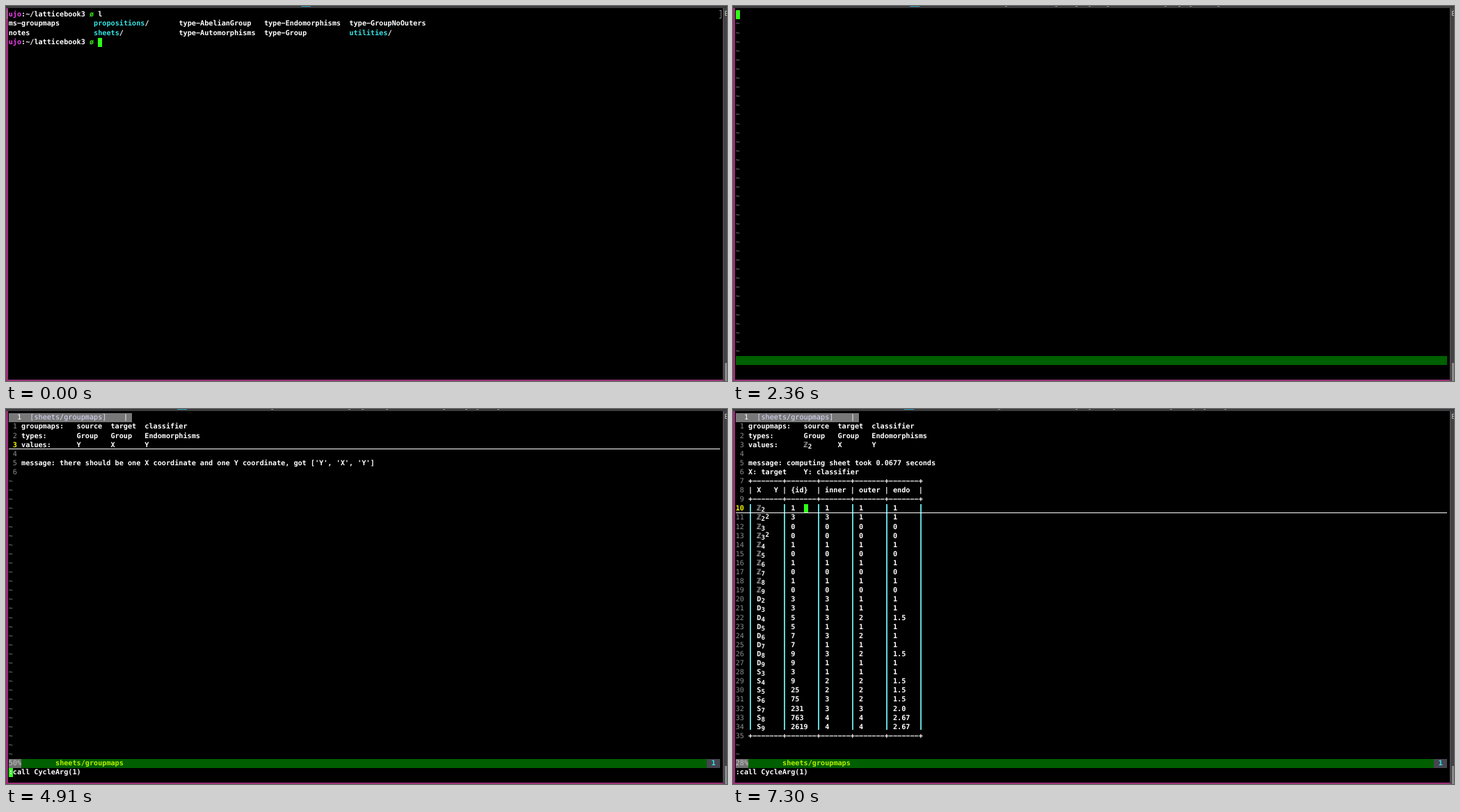
These frames come from a looping animation (1036x540 px, 8000 ms). An HTML page:

```html
<!DOCTYPE html>
<html lang="en">
<head>
<meta charset="utf-8">
<title>Terminal</title>
<style>
html, body { margin: 0; width: 100%; height: 100%; overflow: hidden; background: #000; }
#stage { position: relative; width: 1036px; height: 540px; overflow: hidden; background: #000; }
#stage i { position: absolute; display: block; }
#stage b {
  position: absolute; white-space: pre; font: 10.166px/13.1px "DejaVu Sans Mono", monospace;
  text-rendering: geometricPrecision;
}
#stage b.bold { font-weight: bold; }
#stage b.index { font-size: 9.2px; }
</style>
</head>
<body>
<div id="stage"></div>
<script>
const LOOP = 8000, CW = 6.12, RH = 13.1, X0 = 3.7, Y0 = 6.3, COLS = 167;
const WHITE = '#fff', GREY = '#8c8c8c', CYAN = '#35e3e3', GREEN = '#2fff17',
      MAGENTA = '#f03cf0', YELLOW = '#f5f500', BORDER = '#9c3078', BAR = '#005f00';
const PROMPT = ':~/latticebook3 ';
const LOWER = '₀₁₂₃₄₅₆₇₈₉';

const rect = (x, y, w, h, color) =>
  `<i style="left:${x}px;top:${y}px;width:${w}px;height:${h}px;background:${color}"></i>`;
const fill = (row, col, n, color) =>
  rect(X0 + col * CW, Y0 + row * RH, n * CW, RH, color);
const glyphs = (row, col, text, color, cls, dy = 0) =>
  `<b class="${cls}" style="left:${X0 + col * CW}px;top:${Y0 + row * RH + dy}px;color:${color}">${text}</b>`;

// Index digits get their own cell, everything else is set as one run.
function put(row, col, text, color = WHITE, cls = 'bold') {
  let out = '';
  for (const run of text.match(/[₀-₉²ℤ]|[^₀-₉²ℤ]+/g) || []) {
    const low = LOWER.indexOf(run);
    if (low >= 0) out += glyphs(row, col, low, color, 'bold index', 2);
    else if (run === '²') out += glyphs(row, col, 2, color, 'bold index', -1.5);
    else if (run.trim()) out += glyphs(row, col, run.replace(/-/g, '−'), color, cls);
    col += run.length;
  }
  return out;
}

function frame(tab, ticks) {
  return rect(0, 0, 1036, 3, '#3c3b3d') + rect(tab, 0, 14, 1, '#2aa5c4') +
    ticks.map(x => rect(x, 0, 3, 1, '#8f8f8f')).join('') +
    rect(0, 3, 3, 537, BORDER) + rect(0, 538, 1030, 2, BORDER) +
    rect(1030, 3, 6, 537, '#434244') + rect(1030, 3, 1, 537, '#565557') +
    rect(1033, 7, 3, 7, '#b5b5b5') + rect(1034, 8, 2, 2, '#434244') + rect(1034, 11, 2, 2, '#434244') +
    rect(1033, 514, 3, 26, '#8b8a8c');
}

function marks(row) {
  const y = Y0 + row * RH, c = '#858585';
  return rect(1, y, 1, 11, c) + rect(1, y, 2, 1, c) + rect(1, y + 11, 2, 1, c) +
    rect(1027, y, 1, 11, c) + rect(1025, y, 2, 1, c) + rect(1025, y + 11, 3, 1, c);
}

const prompt = row => put(row, 0, 'ujo', MAGENTA) + put(row, 3, PROMPT) + put(row, 19, 'ø', '#39d916');

function shell(typed, done) {
  const dir = (row, col, name) => put(row, col, name, CYAN) + put(row, col + name.length, '/');
  return frame(424, []) + marks(0) + (done ? marks(3) : '') +
    prompt(0) + put(0, 21, 'l') +
    put(1, 0, 'ms-groupmaps') + dir(1, 20, 'propositions') + put(1, 40, 'type-AbelianGroup') +
    put(1, 60, 'type-Endomorphisms') + put(1, 80, 'type-GroupNoOuters') +
    put(2, 0, 'notes') + dir(2, 20, 'sheets') + put(2, 40, 'type-Automorphisms') +
    put(2, 60, 'type-Group') + dir(2, 80, 'utilities') +
    prompt(3) + put(3, 21, typed) + fill(3, 21 + typed.length, 1, GREEN);
}

function tildes(from) {
  let out = '';
  for (let row = from; row < 38; row++) out += put(row, 0, '~', '#8a8a8a', '');
  return out;
}

const opening = (tab, ticks) =>
  frame(tab, ticks) + fill(0, 0, 1, GREEN) + tildes(1) + fill(38, 0, COLS, BAR);

function editor({ name, lines, line, col, rule = WHITE, cmd = '', busy, tab, ticks }) {
  const pct = Math.floor(100 * line / lines.length) + '%';
  let out = frame(tab, ticks) + fill(0, 0, 29, '#787878') + put(0, 2, '1', WHITE, '') +
    put(0, 5, `[${name}]`, '#dcdcff', '') + put(0, 27, '|', WHITE, '');
  out += busy ? fill(39, 0, 1, GREEN) : fill(line, 3 + col, 1, GREEN);
  lines.forEach((text, i) => {
    const row = i + 1, now = row === line;
    out += put(row, 0, String(row).padStart(2), now ? YELLOW : GREY, now ? 'bold' : '') + put(row, 3, text);
  });
  if (lines.length > 30) {
    for (let c = 0; c <= 40; c += 8)
      out += rect(X0 + (c + 3.5) * CW - .7, Y0 + 10 * RH, 1.4, 25 * RH - 3, '#62d5d5');
  }
  out += rect(X0, Y0 + line * RH + 11.7, COLS * CW, 1.2, rule);
  return out + tildes(lines.length + 1) + fill(38, 0, COLS, BAR) +
    fill(38, 0, pct.length, '#707070') + put(38, 0, pct, '#c4c4c4', '') +
    put(38, pct.length + 8, name, '#b4f000') +
    fill(38, 164, 3, '#454550') + put(38, 165, '1', CYAN) + put(39, 0, cmd);
}

const source = [
  'source   target   classifier',
  'Group Group Endomorphisms',
  '',
  'classify injective group homomorphisms from source to target, up to composition with ' +
    'automorphisms from the given group of automorphisms of the target group',
  ''
];
const head = first => [
  'groupmaps:   source  target  classifier',
  'types:       Group   Group   Endomorphisms',
  'values:      ' + first.padEnd(8) + 'X       Y',
  ''
];
const failed = [...head('Y'),
  "message: there should be one X coordinate and one Y coordinate, got ['Y', 'X', 'Y']", ''];

const ruler = '+' + '-------+'.repeat(5);
const cells = `ℤ₂ 1 1 1 1,ℤ₂² 3 3 1 1,ℤ₃ 0 0 0 0,ℤ₃² 0 0 0 0,ℤ₄ 1 1 1 1,ℤ₅ 0 0 0 0,ℤ₆ 1 1 1 1,
ℤ₇ 0 0 0 0,ℤ₈ 1 1 1 1,ℤ₉ 0 0 0 0,D₂ 3 3 1 1,D₃ 3 1 1 1,D₄ 5 3 2 1.5,D₅ 5 1 1 1,D₆ 7 3 2 1,
D₇ 7 1 1 1,D₈ 9 3 2 1.5,D₉ 9 1 1 1,S₃ 3 1 1 1,S₄ 9 2 2 1.5,S₅ 25 2 2 1.5,S₆ 75 3 2 1.5,
S₇ 231 3 3 2.0,S₈ 763 4 4 2.67,S₉ 2619 4 4 2.67`;
const table = [...head('ℤ₂'),
  'message: computing sheet took 0.0677 seconds',
  'X: target    Y: classifier',
  ruler, '| X   Y | {id}  | inner | outer | endo  |', ruler,
  ...cells.split(',').map(r => '  ' + r.trim().split(' ').map(c => c.padEnd(8)).join('')),
  ruler];

const sheet = (lines, line, cmd, busy) => editor({
  name: 'sheets/groupmaps', lines, line, col: 13, cmd, busy,
  tab: 246, ticks: [381, 492, 511, 546, 628, 660, 676, 706]
});

const view = ':call ViewSheet()', cycle = ':call CycleArg(1)';
const steps = [
  [0, shell('')],
  [600, shell('pe')],
  [740, shell('pev')],
  [890, shell('pevo ')],
  [1330, shell('pevo m')],
  [1480, shell('pevo ms')],
  [1620, shell('pevo ms-groupmaps ', true)],
  [2070, opening(424, [])],
  [2220, opening(360, [512, 560, 592])],
  [2360, opening(254, [391, 463, 492, 511, 537, 620, 640, 656, 696])],
  [2510, editor({
    name: 'ms-groupmaps', lines: source, line: 5, col: 0, rule: '#d8d800',
    tab: 254, ticks: [391, 463, 492, 511, 537, 620, 640, 656, 696]
  })],
  [3560, sheet(failed, 3, view)],
  [4910, sheet(failed, 3, cycle, true)],
  [5060, sheet(table, 3, cycle)],
  [6560, sheet(table, 8, cycle)],
  [7010, sheet(table, 9, cycle)],
  [7300, sheet(table, 10, cycle)]
];

const stage = document.getElementById('stage');
const start = performance.now();
let shown = -1;
function draw() {
  const t = (performance.now() - start) % LOOP;
  const next = steps.findLastIndex(([at]) => at <= t);
  if (next !== shown) stage.innerHTML = steps[shown = next][1];
  requestAnimationFrame(draw);
}
draw();
</script>
</body>
</html>
```
